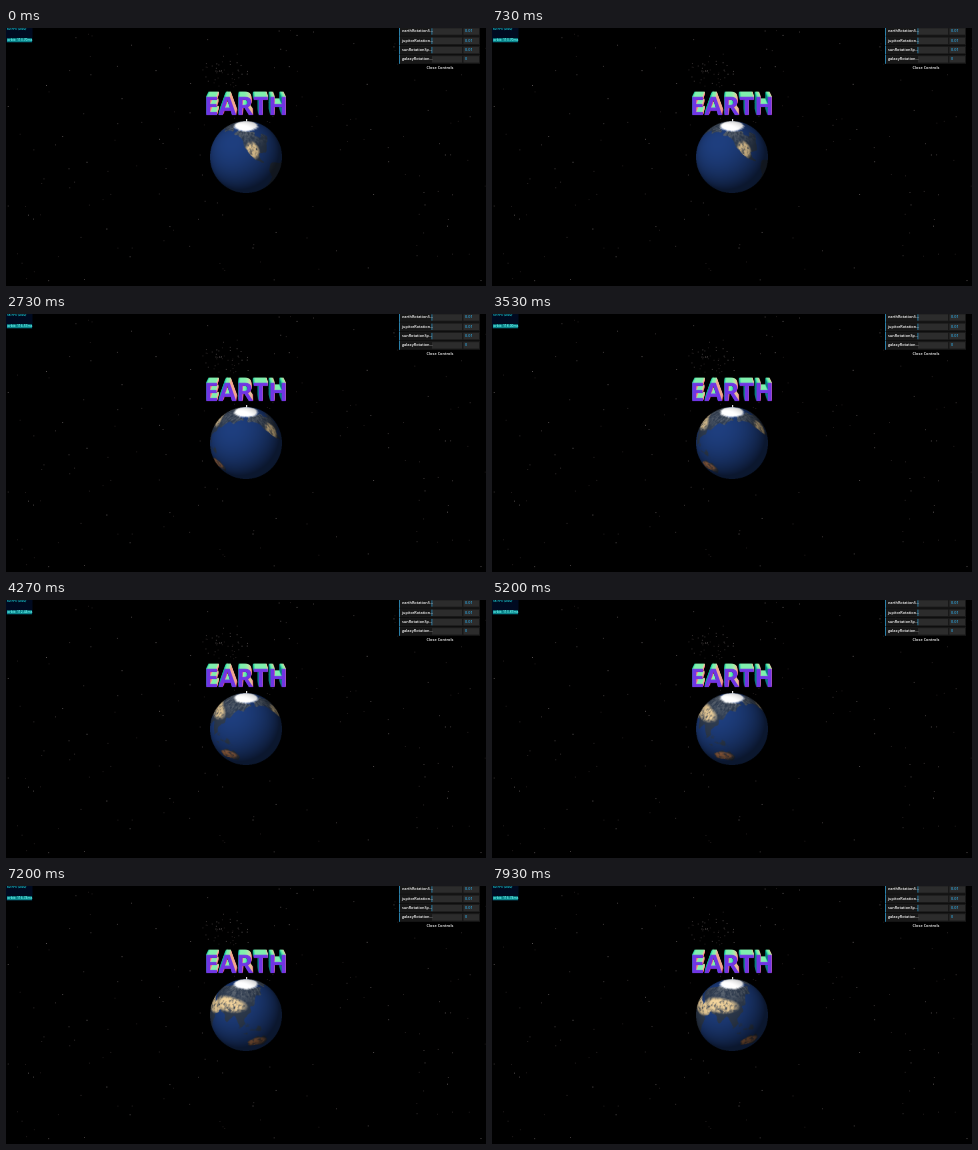
Write an HTML page with a canvas that moves like this. It is 480 by 258 pixels and loops after 8 s.

```html
<!DOCTYPE html>
<html lang="en">
<head>
<meta charset="utf-8">
<title>Earth</title>
<style>
html, body { margin: 0; width: 100%; height: 100%; overflow: hidden; background: #000; }
canvas { display: block; width: 480px; height: 258px; }
</style>
</head>
<body>
<canvas id="stage" width="480" height="258"></canvas>
<script>
const LOOP = 8000, STEP = 1000 / 15;
const RAD = Math.PI / 180, TILT = 25 * RAD;
const ctx = document.getElementById('stage').getContext('2d');

const clamp = v => Math.max(0, Math.min(1, v));
const mix = (a, b, k) => a.map((v, i) => v + (b[i] - v) * k);

function layer(w, h) {
  const c = document.createElement('canvas');
  c.width = w;
  c.height = h;
  return c.getContext('2d', { willReadFrequently: true });
}

function seeded(seed) {
  return () => {
    seed = (seed * 1664525 + 1013904223) >>> 0;
    return seed / 4294967296;
  };
}

// Smooth value noise, summed over octaves
const gridRnd = seeded(29);
const grid = Array.from({ length: 4096 }, gridRnd);
const cell = (x, y) => grid[(y & 63) * 64 + (x & 63)];
const ease = v => v * v * (3 - 2 * v);

function valueNoise(x, y) {
  const ix = Math.floor(x), iy = Math.floor(y);
  const fx = ease(x - ix), fy = ease(y - iy);
  const top = cell(ix, iy) * (1 - fx) + cell(ix + 1, iy) * fx;
  const low = cell(ix, iy + 1) * (1 - fx) + cell(ix + 1, iy + 1) * fx;
  return top * (1 - fy) + low * fy;
}

function noise(x, y) {
  let sum = 0;
  for (let o = 0, a = .5; o < 4; o++, a /= 2) sum += a * valueNoise(x * 2 ** o + o * 17, y * 2 ** o);
  return sum / .9375;
}

// Rough outlines as longitude, latitude; noise adds the coast detail
const outlines = [
  [0,50, 10,58, 30,71, 75,73, 105,78, 140,73, 190,66, 163,60, 157,52, 140,57, 128,38, 118,39, 122,30,
    108,20, 109,11, 103,3, 97,17, 90,22, 78,8, 72,21, 57,26, 58,20, 45,13, 35,29, 35,36, 0,44],
  [0,36, 32,31, 51,11, 40,-10, 20,-35, 9,4, 0,5],
  [114,-23, 131,-12, 138,-17, 143,-12, 153,-27, 148,-38, 131,-32, 116,-35],
  [192,60, 204,71, 250,69, 278,68, 266,60, 280,53, 295,60, 304,50, 285,38, 279,26, 263,29, 264,19,
    278,8, 255,20, 236,41, 232,52, 215,60],
  [282,9, 324,-6, 305,-34, 288,-54, 289,-18, 280,-4]
];
const sand = [236, 206, 152], rust = [196, 128, 84];
const deserts = [
  { lon: 75, lat: 39, w: 43, h: 14, tint: sand },
  { lon: 28, lat: 25, w: 42, h: 13, tint: sand },
  { lon: 251, lat: 35, w: 16, h: 17, tint: sand },
  { lon: 131, lat: -25, w: 20, h: 11, tint: rust }
];
const ocean = [29, 60, 122], forest = [45, 58, 78], frost = [170, 172, 170], ice = [285, 285, 285];
const TW = 720, TH = 360;

function landMask() {
  const c = layer(TW, TH);
  c.filter = 'blur(3px)';
  c.fillStyle = '#fff';
  for (const p of outlines) {
    c.beginPath();
    for (let i = 0; i < p.length; i += 2) c.lineTo(p[i] * 2, (90 - p[i + 1]) * 2);
    c.fill();
  }
  // Half-covered sea that the noise breaks into islands
  c.globalAlpha = .4;
  c.beginPath();
  c.ellipse(242, 180, 48, 24, .2, 0, 7);
  c.fill();
  return c.getImageData(0, 0, TW, TH).data;
}

function makeMap() {
  const mask = landMask();
  const map = new Float32Array(TW * TH * 3);
  for (let j = 0; j < TH; j++) {
    for (let i = 0; i < TW; i++) {
      const lon = i / 2, lat = 90 - j / 2;
      const n = noise(lon / 7, lat / 7 + 40), rough = noise(lon / 4 + 9, lat / 4 + 20);
      const land = clamp((mask[(j * TW + i) * 4 + 3] / 255 + (n - .5) * .8 - .5) * 7 + .5);
      let ground = mix(forest, frost, clamp((lat - 38) / 60) * clamp(rough * 2.4 - .8));
      for (const d of deserts) {
        const r = ((lon - d.lon) / d.w) ** 2 + ((lat - d.lat) / d.h) ** 2;
        ground = mix(ground, d.tint, clamp(1.6 * (1 - r)) * clamp(rough * 2.6 - .45));
      }
      const color = mix(mix(ocean, ground, land), ice, clamp((lat - 71 + n * 4) / 5));
      map.set(color, (j * TW + i) * 3);
    }
  }
  return map;
}

// The view is fixed, so each globe pixel keeps its latitude and longitude offset
const R = 36, SIZE = R * 6;
const globe = layer(SIZE, SIZE);
const globeImage = globe.createImageData(SIZE, SIZE);
const map = makeMap();
const samples = [];
for (let j = 0; j < SIZE; j++) {
  for (let i = 0; i < SIZE; i++) {
    const x = (i + .5) / (SIZE / 2) - 1, y = 1 - (j + .5) / (SIZE / 2);
    const d = 1 - x * x - y * y;
    if (d < 0) continue;
    const z = Math.sqrt(d);
    const up = y * Math.cos(TILT) + z * Math.sin(TILT);
    const front = z * Math.cos(TILT) - y * Math.sin(TILT);
    samples.push({
      at: (j * SIZE + i) * 4,
      row: Math.min(TH - 1, Math.floor((90 - Math.asin(up) / RAD) * 2)) * TW,
      lon: Math.atan2(x, front) / RAD,
      light: .38 + .66 * Math.max(0, -.38 * x + .42 * y + .82 * z)
    });
  }
}

function drawGlobe(center) {
  const out = globeImage.data;
  for (const s of samples) {
    const k = (s.row + Math.floor((s.lon + center + 720) % 360 * 2)) * 3;
    for (let c = 0; c < 3; c++) out[s.at + c] = map[k + c] * s.light;
    out[s.at + 3] = 255;
  }
  globe.putImageData(globeImage, 0, 0);
  ctx.imageSmoothingQuality = 'high';
  ctx.drawImage(globe.canvas, 240 - R, 129 - R, 2 * R, 2 * R);
}

// Extruded word: every side is coloured by its normal as seen from the tilted camera
function drawTitle(c) {
  const zoom = 8, w = 100 * zoom, h = 32 * zoom, depth = 6.3, layers = 26;
  const word = (target, color, blur) => {
    target.filter = blur ? `blur(${blur}px)` : 'none';
    target.font = `bold ${25.8 * zoom}px "Open Sans", sans-serif`;
    target.textAlign = 'center';
    target.fillStyle = color;
    target.fillText('EARTH', w / 2, h - 4 * zoom);
    return target;
  };
  const soft = word(layer(w, h), '#fff', 5).getImageData(0, 0, w, h).data;
  const side = word(layer(w, h), '#fff');
  const image = side.getImageData(0, 0, w, h);
  const alpha = (x, y) => soft[(y * w + x) * 4 + 3];
  for (let y = 2; y < h - 2; y++) {
    for (let x = 2; x < w - 2; x++) {
      const gx = alpha(x - 2, y) - alpha(x + 2, y), gy = alpha(x, y + 2) - alpha(x, y - 2);
      const len = Math.hypot(gx, gy) || 1;
      const nx = gx / len, ny = gy / len;
      image.data.set([128 + 120 * nx, 128 + 112 * ny, 128 + 45 * ny], (y * w + x) * 4);
    }
  }
  side.putImageData(image, 0, 0);
  const face = word(layer(w, h), '#7035e4');
  c.imageSmoothingQuality = 'high';
  for (let i = layers; i >= 0; i--) {
    const back = i / layers, s = (1 - .06 * back) / zoom;
    c.drawImage((i ? side : face).canvas, 240 - w * s / 2, 91.2 - depth * back - h * s, w * s, h * s);
  }
}

function text(c, str, x, y, size, color, align = 'left') {
  c.font = `600 ${size}px "Open Sans", sans-serif`;
  c.textAlign = align;
  c.textBaseline = 'middle';
  c.fillStyle = color;
  c.fillText(str, x, y);
}

function box(c, color, x, y, w, h) {
  c.fillStyle = color;
  c.fillRect(x, y, w, h);
}

function drawPanel(c) {
  const labels = ['earthRotationS...', 'jupitorRotation...', 'sunRotationSp...', 'galaxyRotation...'];
  labels.forEach((label, i) => {
    const y = 3.5 + i * 9.3, last = i === labels.length - 1;
    box(c, '#181818', 393, y - 4.6, 81, 9);
    box(c, '#2a7fa8', 393, y - 4.6, 1, 9);
    box(c, '#2c2c2c', 426, y - 3.2, 30, 6.4);
    box(c, '#2c2c2c', 457.5, y - 3.2, 15.5, 6.4);
    if (!last) box(c, '#2f8fbd', 425.5, y - 3.2, .8, 6.4);
    text(c, label, 396, y, 3.8, '#fff');
    text(c, last ? '0' : '0.01', 459, y, 3.8, '#2fa1d6');
  });
  text(c, 'Close Controls', 434, 39.7, 3.9, '#fff', 'center');
}

function drawStars(c) {
  const rnd = seeded(91);
  const spread = () => rnd() + rnd() + rnd() - 1.5;
  const star = (x, y) => {
    const v = 30 + 75 * rnd() ** 2;
    box(c, `rgb(${v + 6},${v},${v})`, x, y, .9, .9);
  };
  for (let i = 0; i < 170; i++) star(rnd() * 480, rnd() * 258);
  for (let i = 0; i < 45; i++) star(221 + spread() * 22, 46 + spread() * 20);
}

const scene = layer(480, 258);
box(scene, '#000', 0, 0, 480, 258);
drawStars(scene);
drawTitle(scene);
drawPanel(scene);

function drawStats(second) {
  const rnd = seeded(second * 7919 + 5);
  rnd();
  box(ctx, '#000a20', 0, 0, 26.5, 14.5);
  text(ctx, `${58 + Math.floor(rnd() * 3)} FPS (0-60)`, 1, .9, 3.2, '#1ff0f0');
  box(ctx, '#0a8288', 1, 10.2, 25, 4);
  text(ctx, `orbit: ${(112 + rnd() * 7).toFixed(2)}ms`, 1.2, 12.2, 3.4, '#6ffff8');
}

function frame(now) {
  const t = Math.floor((now % LOOP + .5) / STEP) * STEP / 1000;
  ctx.drawImage(scene.canvas, 0, 0);
  drawGlobe(239 - 17.7 * t);
  box(ctx, '#ddd', 240, 91, 1.2, 2.5);
  drawStats(Math.floor(t));
  requestAnimationFrame(frame);
}
requestAnimationFrame(frame);
</script>
</body>
</html>
```
